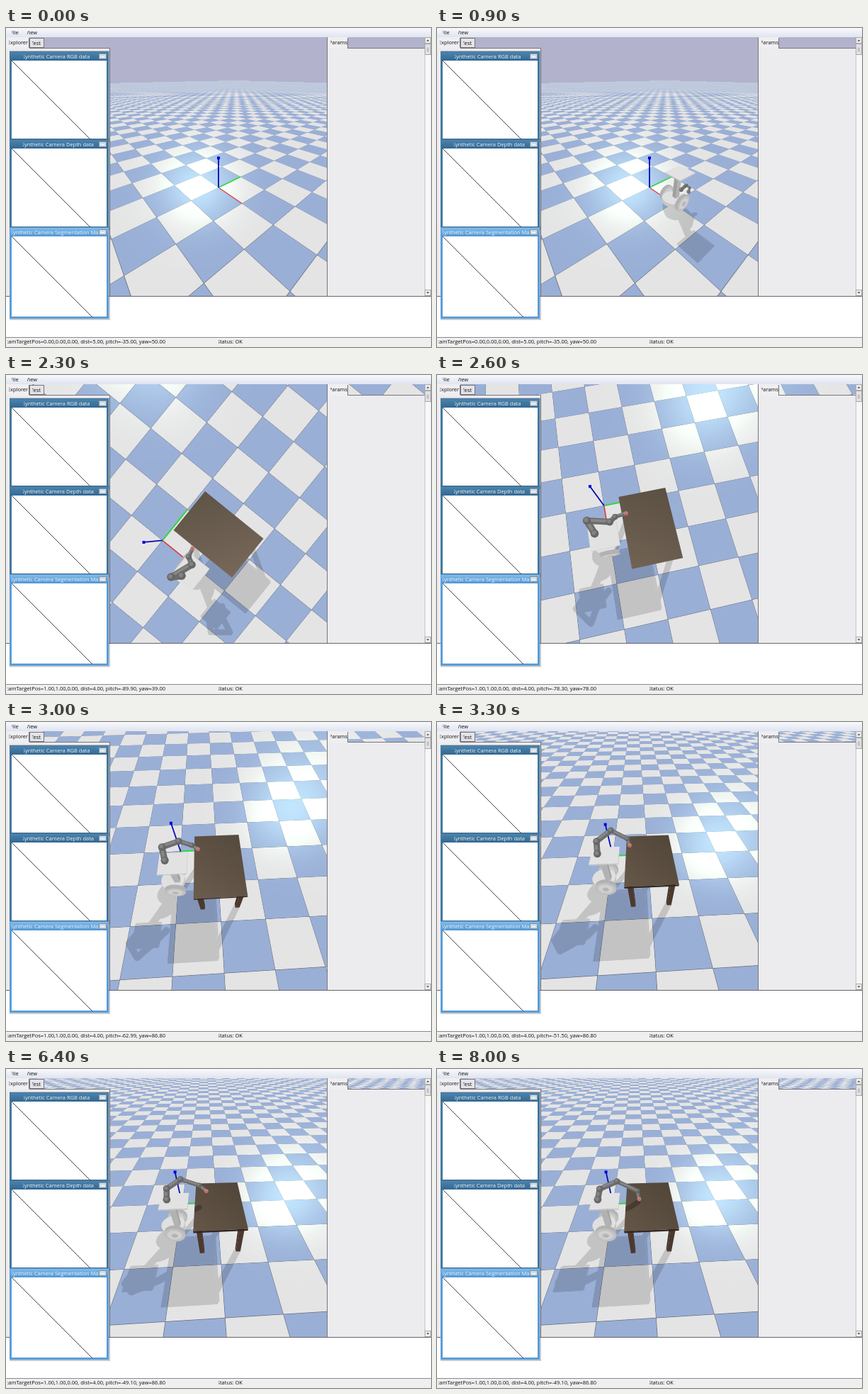
Recreate the animation shown at these times as an HTML page with a canvas. Size 600x450 px, loop 8100 ms.

```html
<!DOCTYPE html>
<html lang="en">
<head>
<meta charset="utf-8">
<title>Physics viewer</title>
<style>
html, body { margin: 0; width: 100%; height: 100%; overflow: hidden; background: #fff; }
canvas { display: block; }
</style>
</head>
<body>
<canvas id="stage" width="600" height="450"></canvas>
<script>
const ctx = document.getElementById('stage').getContext('2d');
const layer = document.createElement('canvas');
layer.width = 600; layer.height = 450;
const dark = layer.getContext('2d');

const LOOP = 8100, STEP = 100, ROBOT_AT = 500, CUT = 1300;
const FOCAL = 225, CX = 300, CY = 225, TOP = 13, BOTTOM = 378;
const SUN = [-0.7071, 0.4243, 0.5657];
const TABLE_Z = 0.82;
const FONT = '7.5px "Open Sans", "Noto Sans", sans-serif';
const ground = ctx.createImageData(600, BOTTOM - TOP);

// Piecewise linear value (number or nested array) over time.
function mix(a, b, k) {
  return Array.isArray(a) ? a.map((v, i) => mix(v, b[i], k)) : a + (b - a) * k;
}
function track(t, keys) {
  if (t <= keys[0][0]) return keys[0][1];
  for (let i = 1; i < keys.length; i++) {
    const [t0, a] = keys[i - 1], [t1, b] = keys[i];
    if (t <= t1) return mix(a, b, (t - t0) / (t1 - t0));
  }
  return keys[keys.length - 1][1];
}

const PITCH = [[2300, -89.9], [2600, -78.3], [3300, -51.5], [3700, -49.1]];
const YAW = [[2000, 0], [2600, 78], [2700, 86.8]];

// Arm joints from base to tool.
const FOLDED = [[1.1, .15, .45], [1.1, .3, .5], [1.05, .42, .45], [1.15, .45, .4], [1.2, .35, .35]];
const RAISED = [[.95, -.065, .93], [.868, -.105, 1.25], [1, .356, 1.45], [.87, .34, 1.3], [.85, .41, 1.15]];
const TURNED = [[.95, -.065, .93], [.785, -.07, 1.25], [.95, .35, 1.42], [.82, .42, 1.25], [.74, .61, 1.1]];
const OVER = [[.92, -.08, .9], [.88, -.03, 1.18], [.83, .28, 1.38], [.83, .57, 1.18], [.85, .6, 1.03]];
const REACH = [[.92, -.08, .9], [.88, -.03, 1.14], [.83, .27, 1.31], [.83, .62, 1.16], [.85, .755, 1.03]];
const LOWER = [[.92, -.08, .9], [.88, .01, 1.13], [.83, .37, 1.26], [.84, .755, 1.03], [.9, .785, .86]];
const ARM = [[2000, RAISED], [2600, TURNED], [3300, OVER], [4800, REACH], [7200, REACH], [8000, LOWER]];

function makeCamera(t) {
  const early = t < CUT;
  const pitch = early ? -35 : track(t, PITCH), yaw = early ? 50 : track(t, YAW);
  const dist = early ? 5 : 4, target = early ? [0, 0, 0] : [1, 1, 0];
  const p = -pitch * Math.PI / 180, y = yaw * Math.PI / 180;
  const sp = Math.sin(p), cp = Math.cos(p), sy = Math.sin(y), cy = Math.cos(y);
  const F = [-sy * cp, cy * cp, -sp], R = [cy, sy, 0], U = [-sy * sp, cy * sp, cp];
  const eye = target.map((v, i) => v - dist * F[i]);
  return { pitch, yaw, dist, target, F, R, U, eye, id: [early, pitch, yaw].join() };
}

let cam;
const dot = (a, b) => a[0] * b[0] + a[1] * b[1] + a[2] * b[2];
function project(p) {
  const d = p.map((v, i) => v - cam.eye[i]);
  const s = FOCAL / dot(d, cam.F);
  return [CX + dot(d, cam.R) * s, CY - dot(d, cam.U) * s, s];
}

// Box-filtered stripes and grid lines for the floor.
const fract = v => v - Math.floor(v);
const stripe = (v, w) =>
  2 * (Math.abs(fract((v - w / 2) / 2) - .5) - Math.abs(fract((v + w / 2) / 2) - .5)) / w;
function gridLine(v, w) {
  const d = Math.abs(v - Math.round(v)), half = .005;
  return Math.max(0, Math.min(d + w / 2, half) - Math.max(d - w / 2, -half)) / w;
}

let groundId = '';
function paintGround() {
  if (groundId === cam.id) return;
  groundId = cam.id;
  const { F, R, U, eye } = cam, px = ground.data;
  for (let y = TOP; y < BOTTOM; y++) {
    const x0 = y < 29 ? 0 : 145, x1 = y < 29 ? 600 : 456;
    const v = (CY - y - .5) / FOCAL;
    for (let x = x0; x < x1; x++) {
      const u = (x + .5 - CX) / FOCAL;
      const dx = F[0] + R[0] * u + U[0] * v;
      const dy = F[1] + R[1] * u + U[1] * v;
      const dz = F[2] + U[2] * v;
      let r = 178, g = 178, b = 204;
      const s = -eye[2] / dz, wx = eye[0] + dx * s, wy = eye[1] + dy * s;
      if (dz < 0 && Math.abs(wx) < 100 && Math.abs(wy) < 100) {
        const k = s / FOCAL * .7, q = U[2] / dz;
        const fx = k * (Math.abs(R[0]) + Math.abs(U[0] - dx * q)) + 1e-4;
        const fy = k * (Math.abs(R[1]) + Math.abs(U[1] - dy * q)) + 1e-4;
        const blue = .5 - .5 * stripe(wx, fx) * stripe(wy, fy);
        const line = 1 - .36 * Math.min(1, gridLine(wx, fx) + gridLine(wy, fy));
        const c = (dx * SUN[0] + dy * SUN[1] - dz * SUN[2]) / Math.hypot(dx, dy, dz);
        const shine = Math.pow(Math.max(0, c), 40);
        r = (228 - 74 * blue) * line + 40 * shine;
        g = (228 - 53 * blue) * line + 54 * shine;
        b = (229 - 15 * blue) * line + 40 * shine;
      }
      const i = ((y - TOP) * 600 + x) * 4;
      px[i] = r; px[i + 1] = g; px[i + 2] = b; px[i + 3] = 255;
    }
  }
}

function trace(c, pts) {
  c.beginPath();
  pts.forEach((p, i) => i ? c.lineTo(p[0], p[1]) : c.moveTo(p[0], p[1]));
}
function fill(c, pts, color) {
  trace(c, pts);
  c.closePath();
  c.fillStyle = color;
  c.fill();
}
function line(c, a, b, color, width) {
  trace(c, [a, b]);
  c.strokeStyle = color;
  c.lineWidth = width;
  c.stroke();
}
function disc(c, x, y, r, color) {
  c.beginPath();
  c.arc(x, y, r, 0, 7);
  c.fillStyle = color;
  c.fill();
}
const gray = v => `rgb(${v},${v},${v})`;

// Faces of a box, wound counter-clockwise seen from outside: top, +x, -y, -x, +y.
function boxFaces([x0, x1, y0, y1, z0, z1]) {
  return [
    [[x0, y0, z1], [x1, y0, z1], [x1, y1, z1], [x0, y1, z1]],
    [[x1, y0, z0], [x1, y1, z0], [x1, y1, z1], [x1, y0, z1]],
    [[x0, y0, z0], [x1, y0, z0], [x1, y0, z1], [x0, y0, z1]],
    [[x0, y1, z0], [x0, y0, z0], [x0, y0, z1], [x0, y1, z1]],
    [[x1, y1, z0], [x0, y1, z0], [x0, y1, z1], [x1, y1, z1]]
  ];
}
function facing(pts) {
  let area = 0;
  pts.forEach((p, i) => {
    const q = pts[(i + 1) % pts.length];
    area += p[0] * q[1] - q[0] * p[1];
  });
  return area < 0;
}
function drawBox(box, [top, xSide, ySide]) {
  boxFaces(box).forEach((face, i) => {
    const pts = face.map(project);
    if (facing(pts)) fill(ctx, pts, [top, xSide, ySide, xSide, ySide][i]);
  });
}

const TABLE = [.25, 1.75, .5, 1.5, .77, TABLE_Z];
const LEGS = [[.3, .55], [.3, 1.35], [1.6, .55], [1.6, 1.35]]
  .map(([x, y]) => [x, x + .1, y, y + .1, 0, .77]);
const PLATE = [.78, 1.28, -.18, .38, .92, .95];
const POLE = [.98, 1.1, -.03, .1, .25, .92];
const WHEELS = [.75, 1.3];

function circle(place) {
  return Array.from({ length: 24 }, (_, i) => place(Math.cos(i * Math.PI / 12), Math.sin(i * Math.PI / 12)));
}
const ring = (x, r) => circle((c, s) => [x, r * c, .22 + r * s]);
const baseDisc = z => circle((c, s) => [1.02 + .27 * c, -.07 + .27 * s, z]);

function drawWheel(x) {
  for (let i = 0; i <= 4; i++) fill(ctx, ring(x - .05 + i * .02, .23).map(project), gray(178));
  fill(ctx, ring(x + .04, .23).map(project), gray(192));
  fill(ctx, ring(x + .04, .16).map(project), gray(208));
  fill(ctx, ring(x + .05, .07).map(project), gray(180));
}
function drawBase() {
  for (let i = 0; i <= 5; i++) fill(ctx, baseDisc(.15 + i * .02).map(project), gray(198));
  fill(ctx, baseDisc(.26).map(project), gray(224));
}

const onPlane = z => p => {
  const k = (p[2] - z) / SUN[2];
  return project([p[0] - SUN[0] * k, p[1] - SUN[1] * k, z]);
};
function shadeArm(joints, drop, thick) {
  const pts = joints.map(drop);
  dark.lineCap = dark.lineJoin = 'round';
  trace(dark, pts);
  dark.strokeStyle = '#000';
  dark.lineWidth = thick * pts[0][2];
  dark.stroke();
}
function applyShade(alpha) {
  ctx.globalAlpha = alpha;
  ctx.drawImage(layer, 0, 0);
  ctx.globalAlpha = 1;
  dark.clearRect(0, 0, 600, 450);
}
function floorShadows(joints, thick, hasTable) {
  const drop = onPlane(0), boxes = [PLATE, POLE];
  if (hasTable) boxes.push(TABLE, ...LEGS);
  const faces = boxes.flatMap(boxFaces);
  faces.push(baseDisc(.2), ...WHEELS.map(x => ring(x, .23)));
  faces.forEach(f => fill(dark, f.map(drop), '#000'));
  shadeArm(joints, drop, thick);
  applyShade(.14);
}

function drawTable(joints) {
  LEGS.forEach(b => drawBox(b, ['#54402f', '#4c392e', '#3a2b23']));
  const k = Math.max(0, (-cam.pitch - 49) / 41);
  const shade = m => `rgb(${[92, 79, 65].map(v => Math.round((v + 16 * k) * m)).join()})`;
  const top = boxFaces(TABLE)[0].map(project);
  const wood = ctx.createLinearGradient(top[3][0], top[3][1], top[1][0], top[1][1]);
  wood.addColorStop(0, shade(.88));
  wood.addColorStop(.55, shade(1));
  wood.addColorStop(1, shade(1.1));
  drawBox(TABLE, [wood, '#33271f', '#3d3027']);
  ctx.save();
  trace(ctx, top);
  ctx.clip();
  shadeArm(joints.slice(1), onPlane(TABLE_Z), .1);
  applyShade(.25);
  ctx.restore();
}

function drawAxes() {
  const o = project([0, 0, 0]), z = project([0, 0, 1]);
  ctx.lineCap = 'butt';
  const w = cam.dist === 5 ? 1.2 : 1.6;
  line(ctx, o, project([1, 0, 0]), '#e03c3c', w);
  line(ctx, o, project([0, 1, 0]), '#35d545', w + .5);
  line(ctx, o, z, '#0808b8', 1.8);
  ctx.fillStyle = '#0000e6';
  ctx.fillRect(z[0] - 2, z[1] - 2, 4, 4);
}

function drawArm(joints, thick, tool) {
  const pts = joints.map(project);
  ctx.lineCap = 'round';
  pts.slice(1).forEach((b, i) => {
    const a = pts[i], w = thick * (1 - i * .14) * b[2];
    line(ctx, a, b, gray(108), w);
    line(ctx, [a[0] - 1, a[1] - 1], [b[0] - 1, b[1] - 1], gray(134), w * .45);
  });
  pts.slice(0, 4).forEach((p, i) => {
    const r = thick * (.66 - i * .08) * p[2];
    disc(ctx, p[0], p[1], r, gray(102));
    disc(ctx, p[0] - 1, p[1] - 1, r * .55, gray(130));
  });
  const end = pts[4];
  disc(ctx, end[0], end[1], 2.8, tool ? '#b98a88' : gray(120));
  if (tool) disc(ctx, end[0], end[1] + 1, 2, '#d26462');
}

function drawRobot(joints, t) {
  drawWheel(WHEELS[0]);
  drawBase();
  drawBox(POLE, [gray(200), gray(178), gray(160)]);
  drawWheel(WHEELS[1]);
  if (t < CUT) drawArm(joints, .08, false);
  drawBox(PLATE, [gray(226), gray(196), gray(188)]);
  if (t >= CUT) drawArm(joints, .12, t >= 2300);
}

function rect(x, y, w, h, color, edge) {
  ctx.fillStyle = color;
  ctx.fillRect(x, y, w, h);
  if (edge) {
    ctx.strokeStyle = edge;
    ctx.lineWidth = 1;
    ctx.strokeRect(x + .5, y + .5, w - 1, h - 1);
  }
}
// Labels lose the left part of their first letter.
function label(text, x, y, color = '#111', right = 600) {
  ctx.save();
  ctx.beginPath();
  ctx.rect(x, y - 9, right - x, 13);
  ctx.clip();
  ctx.fillStyle = color;
  ctx.font = FONT;
  ctx.fillText(text, x - 2.2, y);
  ctx.restore();
}

function drawWindow(title, x, y, h, active) {
  const edge = active ? '#5a9ed8' : '#44789f';
  rect(5, y - 1, 142, h + 3, 'rgba(70,80,100,.3)');
  rect(5, y, 140, h, edge);
  const bar = ctx.createLinearGradient(0, y, 0, y + 12);
  bar.addColorStop(0, active ? '#86bdea' : '#4d86af');
  bar.addColorStop(1, active ? '#5599d6' : '#356a94');
  rect(6, y + 1, 138, 12, bar);
  rect(8, y + 13, 134, h - 16, '#fff');
  label(title, x, y + 9.5, '#eef5fb', 131);
  rect(131, y + 3, 11, 8, '#d3dce4', '#8294a4');
  rect(134, y + 7, 5, 1, '#fff');
  ctx.lineCap = 'butt';
  line(ctx, [8, y + 13], [8 + h - 15, y + h - 2], '#333', .9);
}

function arrow(y, dir) {
  rect(591, y, 9, 9, '#eeeeee', '#aaa');
  fill(ctx, [[593.5, y + 4.5 + dir], [597.5, y + 4.5 + dir], [595.5, y + 4.5 - dir]], '#333');
}

function drawInterface() {
  const menu = ctx.createLinearGradient(0, 0, 0, 13);
  menu.addColorStop(0, '#f8f9fc');
  menu.addColorStop(1, '#dfe4f0');
  rect(0, 0, 600, 13, menu);
  label('File', 8, 9);
  label('View', 30, 9);

  rect(0, 28, 147, 351, '#ecebee');
  rect(146, 28, 1, 351, '#77777c');
  rect(0, 13, 33, 16, '#efeef1');
  rect(32, 14, 1, 14, '#77777c');
  rect(33, 14, 21, 14, '#e4e3e7', '#77777c');
  rect(33, 28, 114, 1, '#77777c');
  label('Explorer', 4, 23);
  label('Test', 37, 24);

  rect(453, 28, 139, 351, '#ecebee');
  rect(453, 13, 30, 16, '#efeef1');
  rect(453, 13, 1, 366, '#77777c');
  rect(482, 14, 1, 14, '#77777c');
  rect(482, 28, 110, 1, '#77777c');
  label('Params', 458, 23);

  rect(591, 13, 9, 366, '#f7f7f8');
  rect(591, 13, 1, 366, '#c4c4c8');
  arrow(13, 1);
  rect(591, 22, 9, 16, '#e2e2e5', '#aaa');
  [28, 30, 32].forEach(y => rect(594, y, 3, 1, '#a5a5aa'));
  arrow(369, -1);

  rect(0, 378, 600, 59, '#fff');
  rect(0, 378, 600, 1, '#66666a');
  rect(0, 436, 600, 14, '#efeff0');
  rect(0, 436, 600, 1, '#8a8a8e');

  drawWindow('Synthetic Camera RGB data', 25, 33, 126, false);
  drawWindow('Synthetic Camera Depth data', 24, 157, 126, false);
  drawWindow('Synthetic Camera Segmentation Mask', 8, 281, 129, true);

  const n = v => v.toFixed(2);
  label(`camTargetPos=${cam.target.map(n).join()}, dist=${n(cam.dist)}, ` +
    `pitch=${n(cam.pitch)}, yaw=${n(cam.yaw)}`, 2, 445);
  label('Status: OK', 300, 445);
}

function draw(t) {
  cam = makeCamera(t);
  paintGround();
  ctx.putImageData(ground, 0, TOP);
  const hasTable = t >= CUT;
  const joints = hasTable ? track(t, ARM) : FOLDED;
  const hasRobot = t >= ROBOT_AT;
  if (hasRobot) floorShadows(joints, hasTable ? .15 : .08, hasTable);
  drawAxes();
  if (hasTable) drawTable(joints);
  if (hasRobot) drawRobot(joints, t);
  drawInterface();
}

let last = -1;
function tick() {
  const t = Math.floor(performance.now() % LOOP / STEP) * STEP;
  if (t !== last) draw(last = t);
  requestAnimationFrame(tick);
}
tick();
</script>
</body>
</html>
```
